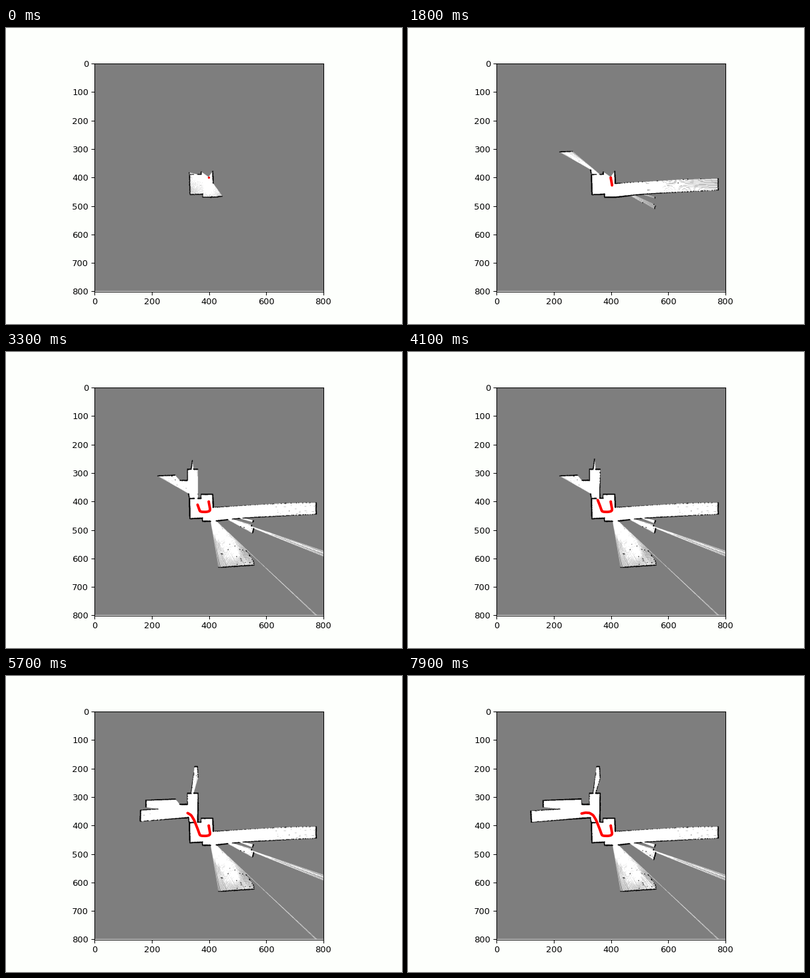
These frames come from a looping animation (600 by 450 pixels, 8 s). A matplotlib script:

```python
import numpy as np
import matplotlib.pyplot as plt
from matplotlib.animation import FuncAnimation

FRAMES, STEP = 80, 100
SIZE = 801
SCANS_PER_FRAME = 2
FIELD = np.radians(np.arange(-135, 136))
REACH = 620

# Floor plan in map cells: each wall is a short polyline.
WALLS = [
    # hall, alcove and right corridor
    [(325, 328), (325, 289), (338, 289)],
    [(346, 289), (362, 289), (361, 391), (373, 391), (373, 377), (413, 377),
     (415, 423), (651, 409), (775, 405), (775, 446), (565, 457), (518, 460)],
    [(508, 461), (482, 463), (482, 464)],
    [(466, 465), (425, 470), (515, 548)],
    # first room
    [(406, 471), (378, 471), (378, 460), (334, 462), (332, 392), (349, 391)],
    # left corridors
    [(332, 392), (329, 374), (122, 390), (120, 351), (224, 344), (163, 341),
     (163, 314), (296, 309), (298, 328), (325, 328)],
    # spaces behind the gaps
    [(338, 289), (350, 195), (360, 195), (362, 235), (346, 289)],
    [(425, 634), (558, 625), (556, 612), (527, 570)],
    [(546, 535), (557, 496)],
    [(548, 488), (557, 466)],
]
# Doors: opening time in seconds and the wall they close.
DOORS = [
    (2.05, [(406, 471), (425, 470)]),
    (1.80, [(466, 465), (482, 463)]),
    (1.80, [(508, 461), (518, 460)]),
    (5.90, [(180, 312), (180, 342)]),
    (6.10, [(161, 346), (160, 388)]),
]
# Robot route: time, x, y.
ROUTE = np.array([(0, 399, 400), (1.8, 404, 427), (2.0, 403, 434), (2.25, 390, 437),
                  (2.6, 369, 436), (3.3, 360, 411), (4.8, 348, 381), (5.2, 338, 364),
                  (5.7, 325, 356), (6.6, 311, 355), (7.9, 297, 358)])


def position(t):
    """Route smoothed over a short time window."""
    window = np.asarray(t)[..., None] + np.linspace(-0.1, 0.1, 9)
    return np.stack([np.interp(window, ROUTE[:, 0], ROUTE[:, k]).mean(-1) for k in (1, 2)], -1)


def heading(t):
    dx, dy = position(t + 0.15) - position(t - 0.15)
    return np.arctan2(dy, dx)


def segments(t):
    lines = WALLS + [door for opening, door in DOORS if t < opening]
    return np.array([pair for line in lines for pair in zip(line, line[1:])], float)


def cross(a, b):
    return a[..., 0] * b[..., 1] - a[..., 1] * b[..., 0]


def cast(origin, rays, walls):
    """Distance along each ray to the nearest wall."""
    start, along = walls[:, 0] - origin, walls[:, 1] - walls[:, 0]
    rays = rays[:, None]
    with np.errstate(divide="ignore", invalid="ignore"):
        slope = cross(rays, along)
        dist = cross(start, along) / slope
        share = cross(start, rays) / slope
    hit = (dist > 0) & (share >= 0) & (share <= 1)
    return np.where(hit, dist, np.inf).min(axis=1)


def mark(points, spread=0):
    """Mask of the cells under the points, widened by `spread` cells."""
    mask = np.zeros((SIZE, SIZE), bool)
    cells = np.rint(points).astype(int)
    cells = cells[((cells > spread) & (cells < SIZE - spread)).all(axis=1)]
    for dx in range(-spread, spread + 1):
        for dy in range(-spread, spread + 1):
            mask[cells[:, 1] + dy, cells[:, 0] + dx] = True
    return mask


def scan(t, rng):
    """One sweep of the range finder: free cells and wall cells."""
    origin = position(t)
    angles = heading(t) + FIELD + rng.uniform(-0.5, 0.5) * np.radians(1)
    rays = np.column_stack([np.cos(angles), np.sin(angles)])
    dist = cast(origin, rays, segments(t))
    dist += rng.normal(0, 0.5, dist.size)
    stray = (dist > 150) & (rng.random(dist.size) < 0.05)
    dist[stray] *= rng.uniform(0.6, 1, stray.sum())

    steps = np.arange(REACH)
    points = origin + rays[:, None] * steps[:, None]
    free = mark(points[steps < dist[:, None] - 1.5])
    solid = np.isfinite(dist)
    wall = mark(origin + rays[solid] * dist[solid, None], spread=1)
    return free & ~wall, wall


def explore():
    """Shade of the map after every frame: black wall, grey unknown, white free."""
    rng = np.random.default_rng(4)
    odds = np.zeros((SIZE, SIZE), np.int8)
    maps = []
    for i in range((FRAMES - 1) * SCANS_PER_FRAME + 1):
        free, wall = scan(i * STEP / 1000 / SCANS_PER_FRAME, rng)
        odds = np.clip(odds - free + 3 * wall, -4, 3).astype(np.int8)
        if i % SCANS_PER_FRAME == 0:
            shade = np.where(odds > 0, 0, np.where(odds < 0, 255, 126))
            maps.append(shade.astype(np.uint8))
    return maps


maps = explore()

fig, ax = plt.subplots(figsize=(6.4, 4.8), dpi=93.75, facecolor="#fdfffc")
image = ax.imshow(maps[0], cmap="gray", vmin=0, vmax=255)
ax.set(xticks=range(0, 801, 200), yticks=range(0, 801, 100))
trail, = ax.plot([], [], color="red", lw=3, solid_capstyle="round", solid_joinstyle="round")
dot, = ax.plot(*position(0), "o", color="red", ms=2.6, mew=0)


def draw(frame):
    image.set_data(maps[frame])
    times = np.arange(frame + 1) * STEP / 1000
    trail.set_data(*position(times).T if frame else ([], []))
    return image, trail, dot


anim = FuncAnimation(fig, draw, frames=FRAMES, interval=STEP, init_func=lambda: (image, trail, dot),
                     repeat=True, repeat_delay=0)
plt.show()
```
